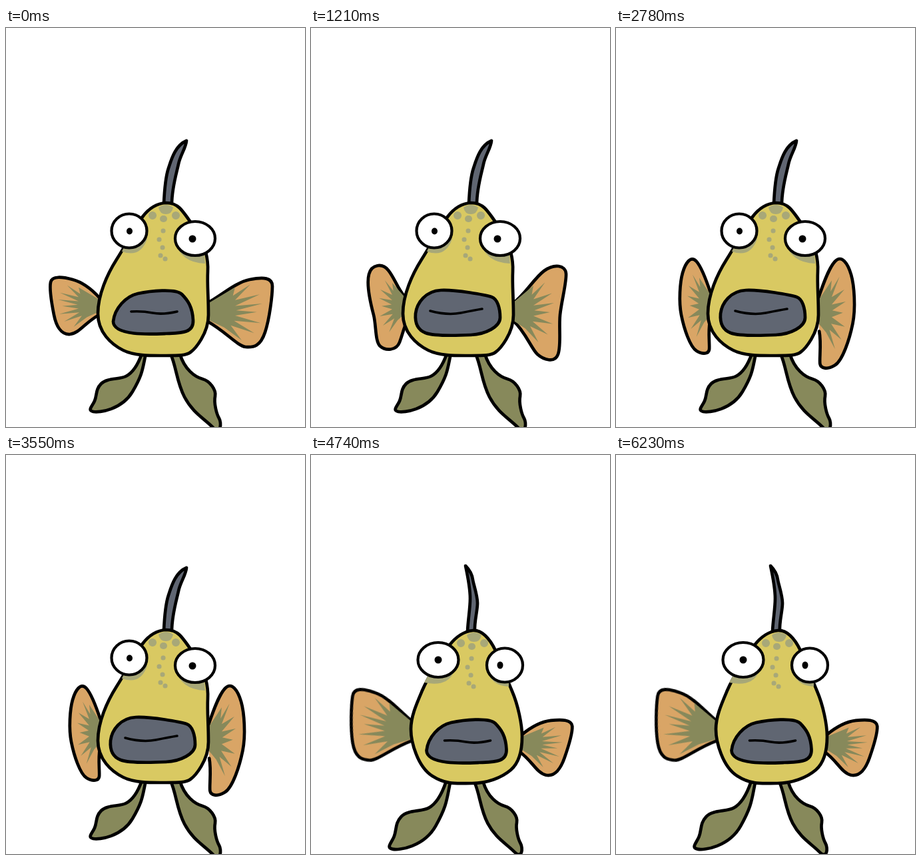
These frames come from a looping animation (449 px wide and 598 px high, 6330 ms). An HTML page without scripts:

```html
<!DOCTYPE html>
<html lang="en">
<head>
<meta charset="utf-8">
<title>Fish</title>
<style>
html, body { margin: 0; width: 100%; height: 100%; overflow: hidden; background: #fff; }
:root { --cycle: calc(6.33s / 8); --stage: -449px; }
svg { display: block; overflow: hidden; }
path, ellipse { stroke: #000; stroke-width: 4.7; stroke-linejoin: round; stroke-linecap: round; vector-effect: non-scaling-stroke; }
.slate { fill: #606672; }
.olive { fill: #87895b; }
.fin { fill: #d9a566; }
.rays { fill: #87895b; stroke: none; }
.body { fill: #d9c962; }
.shade { fill: #a8a878; stroke: none; }
.dot { stroke: #a8a878; stroke-width: 7; }
.big { stroke-width: 12; }
.eye { fill: #fff; stroke-width: 4.2; }
.pupil { stroke: none; }
.line { fill: none; stroke-width: 3.6; }

/* the poses stand side by side, one stage width apart */
.poses { animation: flap var(--cycle) step-end infinite; }
.talk { animation: talk var(--cycle) step-end infinite; }

@keyframes flap {
  0%, 100% { transform: none; }
  23%, 52%, 65% { transform: translateX(var(--stage)); }
  15%, 58.5% { transform: translateX(calc(2 * var(--stage))); }
  31% { transform: translateX(calc(3 * var(--stage))); }
  78% { transform: translateX(calc(4 * var(--stage))); }
  86% { transform: translateX(calc(5 * var(--stage))); }
}
@keyframes talk {
  0%, 100% { d: path("M179 424Q205 431 225 427T257 421"); }
  45%, 65% { d: path("M180 424Q205 425 222 426T256 423"); }
  52% { d: path("M180 423Q219 435 258 422"); }
  58.5% { d: path("M182 423L200 425 220 430 240 424 258 422"); }
}
</style>
</head>
<body>
<svg width="449" height="598" viewBox="0 0 449 598">
<defs>
  <!-- unit fan of rays, stretched to suit each fin -->
  <path id="fan" class="rays" d="M0-.28L.5-.85 .46-.55 .78-.95 .5-.4 .95-.6 .5-.2 1-.28 .52-.04 .9.02 .5.14 .97.4 .48.32 .85.75 .42.48 .62 1 .3.55 0 .28Z"/>

  <g id="wideLeft">
    <path class="fin" d="M140 404C130 393 115 381 100 377S69 371 67 381S69 415 72 430S82 460 96 459S120 440 140 430"/>
    <use href="#fan" transform="translate(140 416) scale(-62 32)"/>
  </g>
  <g id="wideRight">
    <path class="fin" d="M303 412C322 402 345 381 366 377S400 374 400 387S396 435 389 456S372 479 360 478S330 455 303 440"/>
    <use href="#fan" transform="translate(303 425) scale(82 43)"/>
  </g>
  <g id="halfLeft">
    <path class="fin" d="M140 402C130 390 125 374 116 363S91 354 87 369S90 415 94 430S96 470 104 477S128 484 133 471S139 450 143 443"/>
    <use href="#fan" transform="translate(142 416) scale(-40 40)"/>
  </g>
  <g id="halfRight">
    <path class="fin" d="M303 413C322 399 335 375 350 364S382 355 383 368S376 410 374 430S376 475 371 489S349 497 340 489S322 455 303 438"/>
    <use href="#fan" transform="translate(303 425) scale(62 46)"/>
  </g>
  <g id="foldLeft">
    <path class="fin" d="M143 400C138 385 130 360 121 350S104 353 100 367S94 410 98 430S111 478 121 484S139 488 140 482S138 455 141 440"/>
    <use href="#fan" transform="translate(143 415) scale(-36 48)"/>
  </g>

  <path id="legLeft" class="olive" d="M204 488C198 505 190 517 180 522S152 524 143 533S137 550 133 559S122 573 131 575S174 572 190 545S205 510 210 488Z"/>
  <path id="legRight" class="olive" d="M247 488C256 508 256 530 268 553S297 585 310 598S324 592 320 585S312 562 314 552S306 529 295 526S268 512 261 488Z"/>
  <g id="back">
    <path class="slate" d="M237 264C238 240 240 222 244 210S254 176 271 169C270 180 262 190 259 204S249 240 249 264Z"/>
    <use href="#legLeft"/>
    <use href="#legRight"/>
  </g>

  <g id="spots">
    <path class="shade" d="M229 269Q231 279 240 279T251 269Q240 261 229 269Z"/>
    <path class="dot big" d="M220 281h.1M255 281h.1"/>
    <path class="dot" style="stroke-width:10" d="M236 286h1"/>
    <path class="dot" d="M236 304h.1M230 317h.1M235 329h.1M232 341h.1M239 346h.1"/>
  </g>
  <g id="head">
    <path class="body" d="M240 262C226 263 214 271 205 283S180 325 166 347S138 400 138 428S158 474 176 483S220 491 240 491S270 491 277 486S304 458 304 430S302 385 303 365S298 325 288 308S266 275 261 270S250 262 240 262Z"/>
    <path class="shade" d="M174 335Q202 345 212 316L190 300ZM253 318Q262 352 299 353L297 325Z"/>
    <use href="#spots"/>
    <ellipse class="eye" cx="185" cy="304" rx="26.5" ry="25.5"/>
    <ellipse class="pupil" cx="185.5" cy="304.500" rx="4.5" ry="5"/>
    <ellipse class="eye" cx="284" cy="315.5" rx="30" ry="25.5"/>
    <ellipse class="pupil" cx="280" cy="316" rx="5.5" ry="5.5"/>
  </g>

  <g id="pout">
    <path class="slate" d="M161 440C163 420 180 402 198 398S255 390 264 399S280 418 281 438S262 457 240 458S162 462 161 440Z"/>
    <path class="line" d="M188 425Q205 424 220 427T257 425"/>
  </g>
  <g id="grin">
    <path class="slate" d="M157 428C159 412 172 394 195 393S262 400 271 403S284 420 284 434S262 459 240 460S185 462 172 457S156 440 157 428Z"/>
    <path class="line talk" d="M179 424Q205 431 225 427T257 421"/>
  </g>

  <!-- turned the other way: mirrored fins, same spots and pout -->
  <g id="turnBack">
    <path class="slate" d="M235 264C236 245 239 230 239 215S235 180 232 166C238 172 242 180 243 187S250 210 250 222S245 250 246 264Z"/>
    <use href="#legLeft" transform="translate(206 492) scale(1.1 1.16) translate(-207 -490)"/>
    <use href="#legRight" transform="translate(252 492) scale(.95) translate(-254 -490)"/>
  </g>
  <use id="turnLeft" href="#wideRight" transform="translate(455 -11) scale(-1 1)"/>
  <use id="turnRight" href="#wideLeft" transform="translate(455 15) scale(-1 1)"/>
  <g id="turnHead">
    <path class="body" d="M243 263C231 264 218 272 208 285S176 332 167 353S150 392 150 411S160 467 182 481S220 492 242 492S286 484 300 472S317 440 317 422S311 375 302 354S286 312 277 293S256 262 243 263Z"/>
    <path class="shade" d="M170 341Q204 348 214 326L190 305ZM263 320Q270 346 297 347L297 330Z"/>
    <use href="#spots" transform="translate(5 1)"/>
    <ellipse class="eye" cx="191" cy="307" rx="30.5" ry="26"/>
    <ellipse class="pupil" cx="191" cy="307" rx="5.5" ry="5.5"/>
    <ellipse class="eye" cx="291" cy="315" rx="27" ry="25.5"/>
    <ellipse class="pupil" cx="284" cy="315" rx="4.5" ry="5.5"/>
    <use href="#pout" transform="translate(12.5 3)"/>
  </g>
</defs>

<g class="poses">
  <!-- fins wide -->
  <svg width="449" height="598">
    <use href="#back"/><use href="#wideLeft"/><use href="#wideRight"/>
    <use href="#head"/><use href="#pout"/>
  </svg>
  <!-- fins half in -->
  <svg x="449" width="449" height="598">
    <use href="#back"/><use href="#halfLeft"/><use href="#halfRight"/>
    <use href="#head"/><use href="#grin"/>
  </svg>
  <!-- fins opening -->
  <svg x="898" width="449" height="598">
    <use href="#back"/>
    <use href="#halfLeft" transform="translate(140 417) scale(1.15 .84) translate(-140 -420)"/>
    <use href="#halfRight"/>
    <use href="#head"/><use href="#grin"/>
  </svg>
  <!-- fins folded -->
  <svg x="1347" width="449" height="598">
    <use href="#back"/>
    <use href="#foldLeft"/>
    <use href="#foldLeft" transform="translate(304 429) scale(-1.17 1.16) translate(-142 -418)"/>
    <use href="#head"/><use href="#grin"/>
  </svg>
  <!-- turning -->
  <svg x="1796" width="449" height="598">
    <use href="#turnBack"/><use href="#turnLeft"/><use href="#turnRight"/><use href="#turnHead"/>
  </svg>
  <!-- turned -->
  <svg x="2245" width="449" height="598">
    <use href="#turnBack"/>
    <g transform="rotate(9 152 416)"><use href="#turnLeft"/></g>
    <g transform="rotate(8 315 432)"><use href="#turnRight"/></g>
    <use href="#turnHead"/>
  </svg>
</g>
</svg>
</body>
</html>
```
